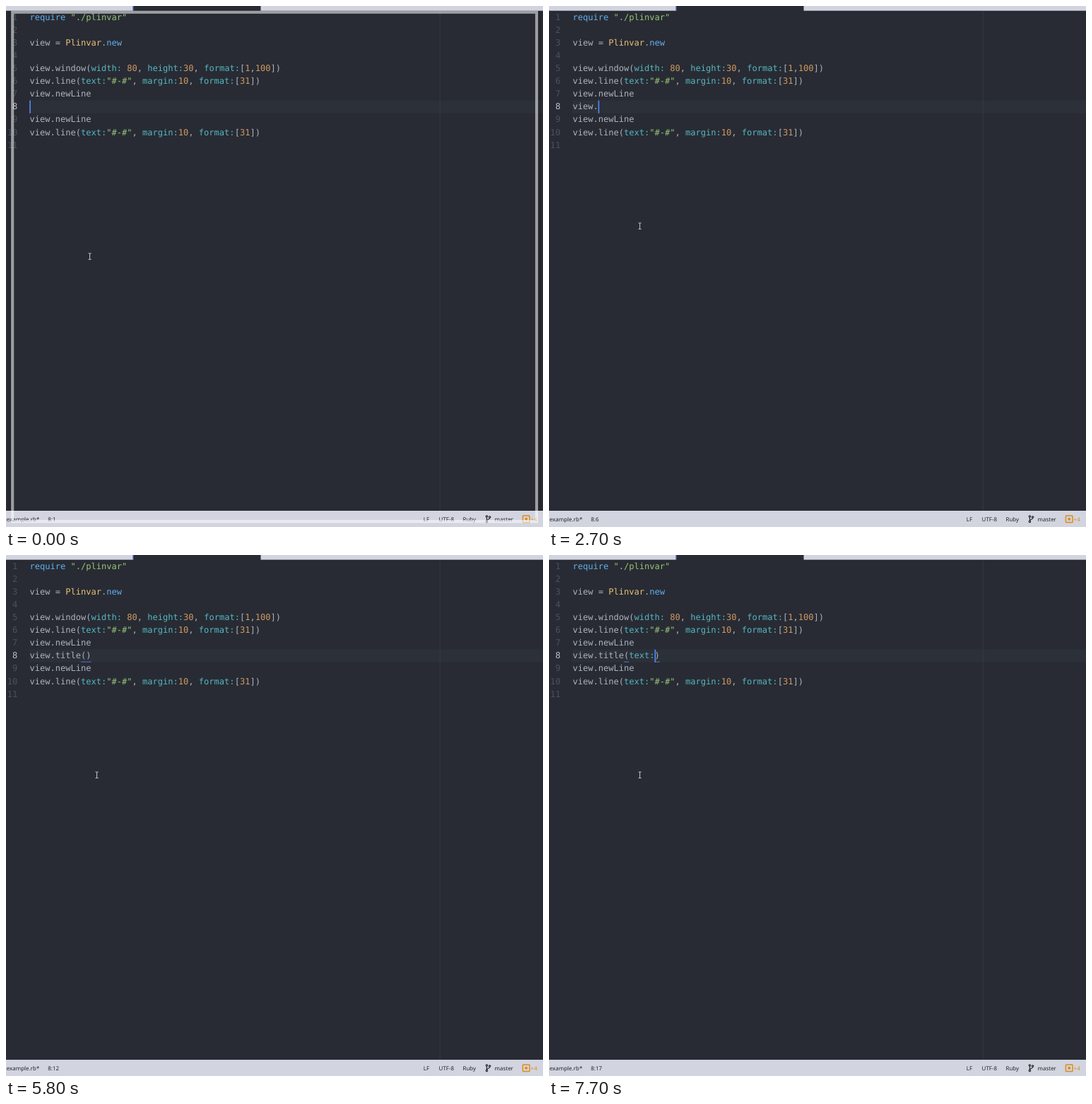
An HTML page for the animation above (8000 ms loop, 760x737 px).

```html
<!DOCTYPE html>
<html lang="en">
<head>
<meta charset="utf-8">
<title>Editor typing</title>
<style>
  html, body { margin: 0; width: 100%; height: 100%; overflow: hidden; background: #282b33; }
  svg { display: block; width: 760px; height: 737px; }
  text { white-space: pre; text-rendering: geometricPrecision; }
  .code { font: 12.06px "DejaVu Sans Mono", monospace; fill: #abb2bf; }
  .num { fill: #4b5162; text-anchor: end; }
  .bold { font-weight: bold; fill: #08090c; }
  .bar { font: 7.95px "Noto Sans", "Open Sans", sans-serif; fill: #23262e; }
</style>
</head>
<body>
<svg id="stage" viewBox="0 0 760 737">
  <rect width="760" height="737" fill="#282b33"/>
  <rect x="33" y="133.5" width="727" height="18.3" fill="#2c3038"/>
  <rect x="613.7" y="7" width="1" height="707" fill="#363a43"/>
  <rect width="760" height="6.7" fill="#d2d5df"/>
  <rect x="180" width="180.5" height="7" fill="#282b33"/>
  <rect x="179.2" width="1.3" height="6.7" fill="#5579cc"/>
  <g id="lines"></g>
  <path id="match" fill="none" stroke="#4c78d0" stroke-width="1"/>
  <rect id="caret" y="133.6" width="1.6" height="18.2" fill="#528bff"/>
  <g id="popup">
    <rect y="152" width="152" height="24" rx="2" fill="#d7d9e2"/>
    <g id="kind">
      <path d="M24 152H2q-2 0-2 2v20q0 2 2 2h22z" fill="#adbfdc"/>
      <text x="8.5" y="167.4" class="code" style="font-weight:bold;fill:#2765b5">f</text>
    </g>
    <text id="hint" y="167.5" class="code bold"></text>
  </g>
  <rect y="714" width="760" height="23" fill="#d2d5df"/>
  <g class="bar">
    <text x="0.8" y="728.5">example.rb*</text>
    <text id="pos" x="59.3" y="728.5"></text>
    <text x="590.8" y="728.5">LF</text>
    <text x="612.6" y="728.5">UTF-8</text>
    <text x="646.5" y="728.5">Ruby</text>
    <text x="691.6" y="728.5">master</text>
    <text x="742.6" y="728.5" style="fill:#df8a1c">+4</text>
  </g>
  <g fill="none" stroke="#23262e" stroke-width="1.2">
    <path d="M680.4 723V728.6M684.6 724.2C684.6 727 680.4 725.6 680.4 728.6"/>
    <circle cx="680.4" cy="722" r="1.2"/>
    <circle cx="684.6" cy="723" r="1.2"/>
    <circle cx="680.4" cy="729.4" r="1.2"/>
  </g>
  <rect x="731.4" y="721" width="9.6" height="9.6" rx="0.8" fill="none" stroke="#df8a1c" stroke-width="1.5"/>
  <rect x="734.4" y="724" width="3.6" height="3.6" rx="0.6" fill="#df8a1c"/>
  <path id="mouse" d="M-2-4.3h1.4q.6 0 .6.6q0-.6.6-.6h1.4M0-3.8V3.8M-2 4.3h1.4q.6 0 .6-.6q0 .6.6.6h1.4" fill="none" stroke="#dcdde1" stroke-width=".9"/>
  <g id="frame" fill="none">
    <path d="M4.6 7V714M755.4 7V714" stroke="#000" stroke-opacity=".1" stroke-width="4.6"/>
    <rect x="9.2" y="8.8" width="741.8" height="720.4" stroke="#fff" stroke-opacity=".54" stroke-width="4.1"/>
  </g>
</svg>
<script>
const LOOP = 8000, LEFT = 33.4, CHAR = 7.261, ROW = 18.12, BASE = 19.5, ACTIVE = 7;
const $ = id => document.getElementById(id);
const colX = col => LEFT + col * CHAR;

const source = [
  'require "./plinvar"', '', 'view = Plinvar.new', '',
  'view.window(width: 80, height:30, format:[1,100])',
  'view.line(text:"#-#", margin:10, format:[31])',
  'view.newLine', '', 'view.newLine',
  'view.line(text:"#-#", margin:10, format:[31])', ''
];

// time, content of the edited line
const typing = [
  [0, ''], [1500, 'v'], [1600, 'view'], [1700, 'view.'],
  [3500, 'view.t'], [3600, 'view.ti'], [3700, 'view.tit'], [3900, 'view.titl'], [4000, 'view.title'],
  [5300, 'view.title()'], [6200, 'view.title(t)'], [6300, 'view.title(te)'],
  [6500, 'view.title(tex)'], [6600, 'view.title(text)'], [7600, 'view.title(text:)']
];
const caretOff = [[400, 800], [1200, 1500], [2300, 2700], [3100, 3500], [4600, 5000], [5800, 6200], [7100, 7500]];
const popups = [
  { from: 3700, to: 4900, x: 36, pad: 33.6, word: 'title', kind: true },
  { from: 6700, to: 7600, x: 106, pad: 7.3, word: 'text', kind: false }
];

const rules = [
  [/^(require|new)$/, '#61afef'], [/^"/, '#98c379'], [/^[A-Z]/, '#e5c07b'],
  [/^\w+:$/, '#56b6c2'], [/^\d+$/, '#d19a66']
];

function svg(tag, attrs, parent) {
  const el = document.createElementNS('http://www.w3.org/2000/svg', tag);
  for (const key in attrs) el.setAttribute(key, attrs[key]);
  parent.appendChild(el);
  return el;
}

function highlight(el, line) {
  el.textContent = '';
  for (const token of line.match(/"[^"]*"|\w+:|\w+|\W/g) || []) {
    const rule = rules.find(([test]) => test.test(token));
    svg('tspan', { fill: rule ? rule[1] : '#abb2bf' }, el).textContent = token;
  }
}

const rows = source.map((line, i) => {
  const y = BASE + i * ROW;
  const num = svg('text', { x: 16.3, y, class: 'code num' }, $('lines'));
  num.textContent = i + 1;
  if (i === ACTIVE) num.style.fill = '#b9bfca';
  const el = svg('text', { x: LEFT, y, class: 'code' }, $('lines'));
  highlight(el, line);
  return el;
});

let shown = null;
function edit(line) {
  if (line === shown) return;
  shown = line;
  highlight(rows[ACTIVE], line);
  const open = line.indexOf('('), close = line.indexOf(')');
  const col = close < 0 ? line.length : close;
  $('caret').setAttribute('x', colX(col) - 0.1);
  $('pos').textContent = '8:' + (col + 1);
  const mark = c => `M${colX(c)} 151.2h${CHAR}`;
  $('match').setAttribute('d', close < 0 ? '' : mark(open) + mark(close));
}

const show = (id, on) => $(id).setAttribute('visibility', on ? 'visible' : 'hidden');

function draw(t) {
  edit(typing.filter(([at]) => at <= t).pop()[1]);
  show('caret', !caretOff.some(([a, b]) => t >= a && t < b));

  const box = popups.find(p => t >= p.from && t < p.to);
  $('popup').style.display = box ? '' : 'none';
  if (box) {
    $('popup').setAttribute('transform', `translate(${box.x})`);
    $('kind').style.display = box.kind ? '' : 'none';
    $('hint').setAttribute('x', box.pad);
    $('hint').textContent = box.word;
  }

  // the recording frame fades and the pointer moves in four steps
  const k = Math.min(1, Math.max(0, Math.floor((t - 100) / 100) / 4));
  $('frame').setAttribute('opacity', 1 - k);
  $('mouse').setAttribute('transform', `translate(${118.6 + 10 * k} ${354.2 - 43 * k})`);
}

function tick() {
  draw(performance.now() % LOOP);
  requestAnimationFrame(tick);
}
tick();
</script>
</body>
</html>
```
